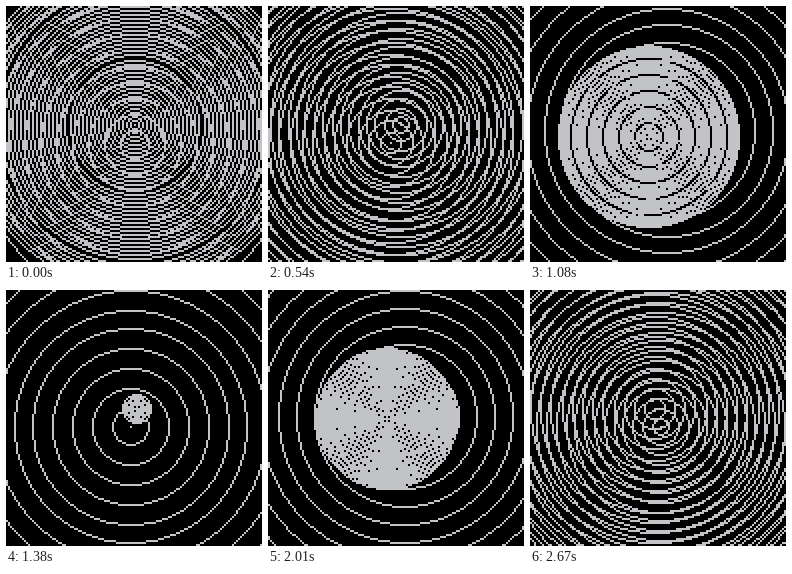
Write an HTML page with a canvas that moves like this. It is 256x256 px and loops after 2700 ms.

```html
<!DOCTYPE html>
<html lang="en">
<head>
<meta charset="utf-8">
<title>Moiré rings</title>
<style>
html, body { margin: 0; width: 100%; height: 100%; overflow: hidden; background: #000; }
canvas { display: block; width: 256px; height: 256px; image-rendering: pixelated; }
</style>
</head>
<body>
<canvas id="stage" width="128" height="128"></canvas>
<script>
const SIZE = 128, MID = 64, ORBIT = 5, RINGS = 40, GAP = 4.998;
const STEP = 30, FRAMES = 90, FPS = 30, TURN = Math.PI * 2;
const ctx = document.getElementById('stage').getContext('2d');

function dot(x, y) {
  if (x >= 0 && y >= 0 && x < SIZE && y < SIZE) ctx.fillRect(x, y, 1, 1);
}

// One-pixel midpoint circle, mirrored over eight octants
function circle(cx, cy, r) {
  let dx = r, dy = 0, err = 1 - r;
  while (dx >= dy) {
    for (const [a, b] of [[dx, dy], [dy, dx]]) {
      dot(cx + a, cy + b);
      dot(cx - a, cy + b);
      dot(cx + a, cy - b);
      dot(cx - a, cy - b);
    }
    dy++;
    if (err < 0) {
      err += 2 * dy + 1;
    } else {
      dx--;
      err += 2 * (dy - dx) + 1;
    }
  }
}

function rings(x, y, gap) {
  const cx = Math.floor(x), cy = Math.floor(y);
  for (let i = 0; i <= RINGS; i++) circle(cx, cy, Math.floor(i * gap));
}

function draw(ms) {
  const n = Math.floor(ms / STEP) % FRAMES;
  const spin = TURN * (n % FPS) / FPS;
  const ox = -ORBIT * Math.sin(spin), oy = ORBIT * Math.cos(spin);
  // Gaps of the two sets swing in opposition over five seconds
  const swing = Math.sin(TURN * (2 + n / FPS) / 5);
  ctx.fillStyle = '#000';
  ctx.fillRect(0, 0, SIZE, SIZE);
  ctx.fillStyle = '#c2c3c7';
  rings(MID - ox, MID - oy, GAP * (1 - swing));
  rings(MID + ox, MID + oy, GAP * (1 + swing));
}

const start = performance.now();
function tick() {
  draw(performance.now() - start);
  requestAnimationFrame(tick);
}
tick();
</script>
</body>
</html>
```
